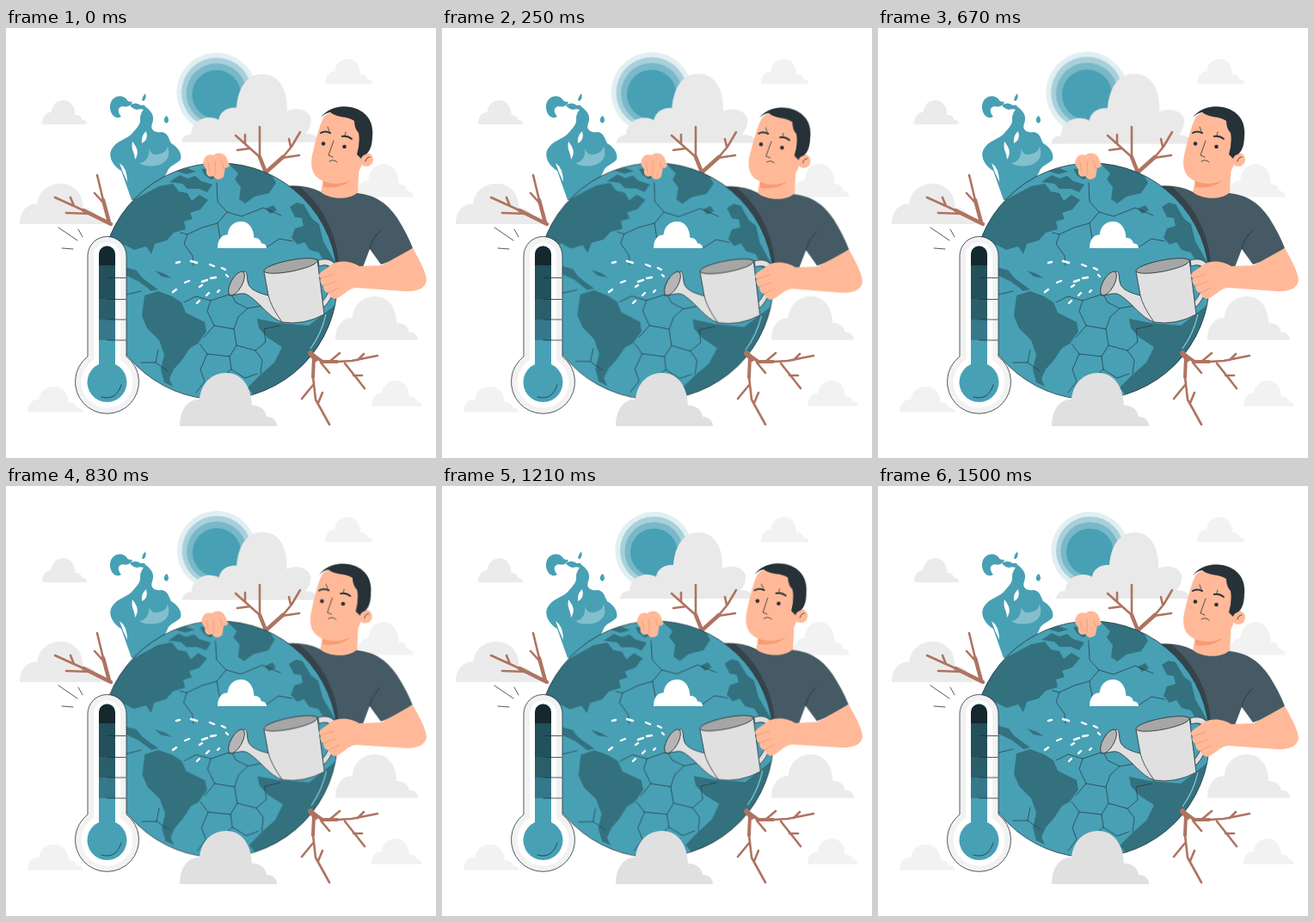
These frames come from a looping animation (500 px wide and 500 px high, 1.54 s). An HTML page without scripts:

```html
<!DOCTYPE html>
<html lang="en">
<head>
<meta charset="utf-8">
<title>Warming planet</title>
<style>
html, body { margin: 0; width: 100%; height: 100%; overflow: hidden; background: #fff; }
svg { display: block; width: 100vw; height: 100vh; }
.teal { fill: #48a0b5; }
.land { fill: #33717f; }
.skin { fill: #ffb998; }
.ink { fill: #263238; }
.line { fill: none; stroke: #263238; stroke-width: .8; stroke-linecap: round; stroke-linejoin: round; }
.crack { stroke-width: .7; }
.fold { stroke: #eb9870; }
.metal { fill: #e0e0e0; stroke: #263238; stroke-width: .8; stroke-linejoin: round; }
.branch { fill: none; stroke: #ae7461; stroke-linecap: round; stroke-linejoin: round; }
.sky { transform-origin: 305px 70px; animation: pulse 1540ms infinite; }
.rock { --tilt: 1deg; transform-origin: 248px 295px; animation: rock 1540ms infinite; }
.man { --tilt: .5deg; }
.head { --tilt: .8deg; transform-origin: 388px 190px; }
@keyframes pulse {
  0% { transform: scale(1.03); animation-timing-function: ease-out; }
  10.7% { transform: scale(1.06); animation-timing-function: ease-in-out; }
  27.3% { transform: scale(1); animation-timing-function: ease-in-out; }
  44.2% { transform: scale(1.06); animation-timing-function: ease-in-out; }
  62%, 100% { transform: scale(1); }
}
@keyframes rock {
  0%, 100% { transform: rotate(0deg); animation-timing-function: ease-out; }
  22% { transform: rotate(var(--tilt)); animation-timing-function: ease-in-out; }
  65%, 78% { transform: rotate(calc(-1 * var(--tilt))); animation-timing-function: ease-in-out; }
}
</style>
</head>
<body>
<svg viewBox="0 0 500 500">
  <defs>
    <path id="cloud" d="M0 62C0 41 11 30 23 31C25 11 38 0 54 0C71 0 83 14 84 38C94 37 100 44 101 51C108 51 113 55 113 62Z"/>
    <clipPath id="disc"><circle cx="248" cy="294.500" r="137.500"/></clipPath>
  </defs>

  <g fill="#ebebeb">
    <use href="#cloud" transform="translate(42 84) scale(.46 .45)"/>
    <use href="#cloud" transform="translate(16 181) scale(.88 .76)"/>
    <use href="#cloud" transform="translate(383 312) scale(.85 .82)"/>
  </g>
  <g fill="#f2f2f2">
    <use href="#cloud" transform="translate(371 36) scale(.49 .47)"/>
    <use href="#cloud" transform="translate(408 158) scale(.58 .62)"/>
    <use href="#cloud" transform="translate(425 410) scale(.52 .48)"/>
    <use href="#cloud" transform="translate(25 417) scale(.57 .48)"/>
  </g>

  <g class="sky">
    <circle cx="246.500" cy="75" r="45" fill="#e1eff2"/>
    <circle cx="246.500" cy="75" r="39.500" fill="#a7d0da"/>
    <circle cx="246.500" cy="76" r="34" fill="#78b8c8"/>
    <circle class="teal" cx="246.500" cy="77" r="27.500"/>
    <path fill="#e9e9e9" d="M207 131C208 124 213 122 218 122C218 110 228 103 239 103Q245 103 249 106C250 96 260 91 269 92C271 69 281 54 298 54C317 54 327 71 326 96C335 91 350 93 353 104Q354 114 347 121C356 121 362 125 362 131Z"/>
  </g>

  <g class="teal">
    <path d="M146 200L134 166C121 158 118 145 125 138C131 130 142 129 148 121C153 115 157 112 156 104Q157 97 163 92C170 98 173 103 170 111C167 119 174 122 180 121C188 121 189 128 192 134C201 139 205 147 203 153C199 158 190 160 188 166L172 200Z"/>
    <path d="M128 104C120 101 119 88 124 83C130 77 138 79 141 84C144 87 147 85 147 86C145 92 138 92 135 91C129 93 130 98 134 103Q131 105 128 104Z"/>
    <path d="M158 84Q159 79 162 76Q164 82 160 85ZM184 109Q183 104 187 102Q191 107 187 111ZM144 90Q150 85 157 90Q163 88 163 96Q157 93 152 95Q147 94 144 90Z"/>
  </g>
  <path fill="#fff" d="M147 132C153 140 155 145 150 153C150 145 145 142 147 132ZM132 157Q141 163 141 179Q136 169 132 157ZM163 120Q157 125 158 134Q166 130 163 120Z"/>
  <path fill="#83bfcd" d="M166 138C167 146 172 149 180 146Q187 144 188 137Q193 153 179 159Q163 163 155 157Q168 155 166 138Z"/>

  <g class="branch" stroke-width="2.600">
    <path stroke-width="4.500" d="M122 228L90 212M120 226L113 200M303 170L295 150M302 168L322 150"/>
    <path d="M90 212L57 197M113 200L106 171M113 203L103 192M98 216L70 215M79 207L75 197M295 150L267 125M295 150L295 115M284 140L269 142M322 150L332 138L342 121M321 151L341 148M331 138L329 129M278 134L278 124"/>
  </g>

  <g class="rock man">
    <path class="skin" d="M370 168L366 192C371 199 398 201 409 194L411 152Z"/>
    <path fill="#f79b72" d="M369 177Q386 185 402 176Q390 188 369 185Z"/>
    <path fill="#455a64" d="M322 184Q347 181 365 190C376 200 399 200 408 192C431 194 445 206 455 221Q467 240 473 256Q456 269 436 275L423 257L415 278L370 278Z"/>
    <path fill="#36434a" d="M322 184L341 184C366 204 385 238 387 275L370 278Z"/>
    <path class="line" d="M423 257Q426 244 435 236"/>
    <g class="rock head">
      <circle class="skin" cx="419" cy="153" r="8"/>
      <path class="skin" d="M370 103C365 111 363 122 359 135L356 148C353 163 357 174 371 179C391 185 409 176 414 158L418 117L396 95Q380 94 370 103Z"/>
      <path class="ink" d="M366 104C373 94 387 89 401 92C420 96 428 110 426 126C426 138 422 145 418 147Q414 148 413 152L408 147Q412 133 410 122Q405 117 405 108C397 102 386 105 377 98Q371 99 366 104Z"/>
      <circle class="ink" cx="369" cy="134.500" r="2.300"/>
      <circle class="ink" cx="393.500" cy="138" r="2.300"/>
      <path class="line" d="M381 131L375 148L380 150M376 155Q381 152 385 156M418 155Q419 150 423 150M374 115L376 120M395 121L394 125"/>
      <path class="line" style="stroke-width:2" d="M366 122Q371 119 377 122M391 126Q397 125 402 129"/>
    </g>
  </g>

  <g class="rock">
    <circle class="teal" cx="248" cy="294.500" r="137.500"/>
    <g clip-path="url(#disc)">
      <g class="land">
        <path d="M108 250L122 225L150 199L178 184L194 181L201 190L211 192L216 201L225 194L235 200L226 211L214 215L217 222L207 225L209 234L195 238L187 247L173 251L169 263L163 254L149 258L138 252L126 258Z"/>
        <path d="M138 278L152 282L158 290L167 297L177 304L169 306L155 295L140 288ZM173 282L185 286L193 291L181 289Z"/>
        <path d="M190 179L202 171L211 175L220 172L227 178L240 182L234 191L224 187L211 187L205 181ZM197 166L211 163L221 167L210 170ZM227 164L245 162L249 172L238 176L231 171Z"/>
        <path d="M258 157L303 160L314 180L306 192L289 196L278 204L271 199L273 185L266 176L270 169Z"/>
        <path d="M161 311L177 306L193 312L204 319L209 331L231 342L233 353L223 367L214 372L204 387L195 397L190 408L194 417L184 412L180 397L184 380L178 363L164 349L158 335Z"/>
        <path d="M292 338L317 343L352 346L388 318L388 390L320 432L289 428L281 418L296 403L312 389L321 371L304 360L294 349Z"/>
        <path d="M330 208L338 203L346 205L356 222L364 228L369 248L386 278L376 283L364 261L353 258L347 249L339 252L332 244L336 233L346 230L344 221L336 220ZM302 210L311 206L315 212L307 216Z"/>
      </g>
      <path class="line crack" d="M245 180L246 202L257 214L274 219L299 209L320 218M257 214L246 227L228 232L211 240L203 238M246 227L249 245M211 240L207 251L217 265L218 276M303 255L318 245L333 248M140 310L157 306M207 319L221 312L238 317L262 309L267 319L281 326L303 322M238 317L234 329L242 346L265 350L270 336L281 326M242 346L230 360M265 350L268 369L290 375L302 365L300 350L318 346M268 369L260 382L262 397L278 407L292 402M290 375L298 386L296 402M260 382L234 379L225 367M234 379L226 397L231 411L221 424M188 399L174 389L157 389M174 389L177 374M262 397L246 410"/>
      <path fill="none" stroke="#8cc5d2" stroke-width="1.200" d="M354 373Q367 355 372 333"/>
    </g>
    <circle class="line" cx="248" cy="294.500" r="137.500"/>

    <path class="skin" d="M229 158C230 148 236 146 241 148C247 143 255 146 257 152L260 160Q257 164 255 162L253 173C249 177 244 177 241 172C237 174 232 172 233 165Z"/>
    <path class="line fold" d="M235 156L237 168M243 155L243 171M251 155L253 163"/>
  </g>

  <g class="rock man">
    <path class="metal" d="M363 270C380 265 389 277 384 294C381 309 377 318 369 325L368 318C374 311 378 302 379 291C382 279 376 273 364 277Z"/>
    <path class="metal" d="M300 283L305 311C297 309 287 306 283 300C279 294 282 283 277 283L259 311C268 311 275 306 282 311C297 321 306 337 321 342Q346 346 370 333L362 269Z"/>
    <ellipse class="metal" style="fill:#a6a6a6" cx="331" cy="276.500" rx="31.500" ry="6.500" transform="rotate(-11 331 276.500)"/>
    <ellipse class="metal" style="fill:#b5b5b5" cx="268" cy="297" rx="6.500" ry="15.500" transform="rotate(29 268 297)"/>
    <path class="line" d="M305 311Q308 324 321 342"/>
    <path class="skin" d="M437 276L473 256C481 270 488 283 489 293C488 303 478 307 463 306L407 302C396 303 392 313 382 315Q376 313 375 308Q369 307 369 300Q364 297 366 291Q362 288 366 284L380 274C391 269 403 272 411 277Z"/>
    <path class="line fold" d="M366 291L381 286M369 300L383 295M375 308L387 302"/>
  </g>

  <g fill="#fff">
    <use href="#cloud" transform="translate(246 225) scale(.505 .5)"/>
    <path fill="none" stroke="#fff" stroke-width="2.400" stroke-linecap="round" d="M198 273L202 272M215 271L222 273M237 275L242 277M251 279L255 281M256 287L258 289M238 291L244 290M228 295L234 293M208 296L213 294M194 307L198 304M225 301L228 299M246 307L248 305M233 311L236 308M222 320L225 317"/>
  </g>

  <g class="branch" stroke-width="2.600">
    <path stroke-width="6" d="M354 378L360 385"/>
    <path stroke-width="4" d="M357 380L368 388L385 388M358 383L357 406"/>
    <path d="M385 388L402 387L432 381M394 390L406 405L417 419M376 388L388 378M404 404L414 404M409 386L416 379M357 406L360 432L376 461M358 414L344 431M363 436L368 424M366 389L376 401"/>
  </g>

  <use href="#cloud" x="202" y="401" fill="#e0e0e0"/>

  <g class="thermometer">
    <path d="M95 265A22.500 22.500 0 0 1 140 265V382A37 37 0 1 1 95 382Z" fill="#f2f2f2" stroke="#263238" stroke-width=".8"/>
    <path d="M102 265A15.500 15.500 0 0 1 133 265V386A30 30 0 1 1 102 386Z" fill="#fff"/>
    <path class="teal" d="M108 263A9.500 9.500 0 0 1 127 263V391A23 23 0 1 1 108 391Z"/>
    <path fill="#34788a" d="M108 335H127V363H108Z"/>
    <path fill="#2a5e6b" d="M108 310H127V339H108Z"/>
    <path fill="#22505b" d="M108 270H127V315H108Z"/>
    <path fill="#15282e" d="M108 276V263A9.500 9.500 0 0 1 127 263V276Z"/>
    <path class="line" d="M118 290.500H139M118 315.500H139M118 339H139M118 363H139M111 429Q128 434 134 415"/>
  </g>
  <path class="line" d="M61 232L83 247M84 234L89 243M65 256L78 257"/>
</svg>
</body>
</html>
```
